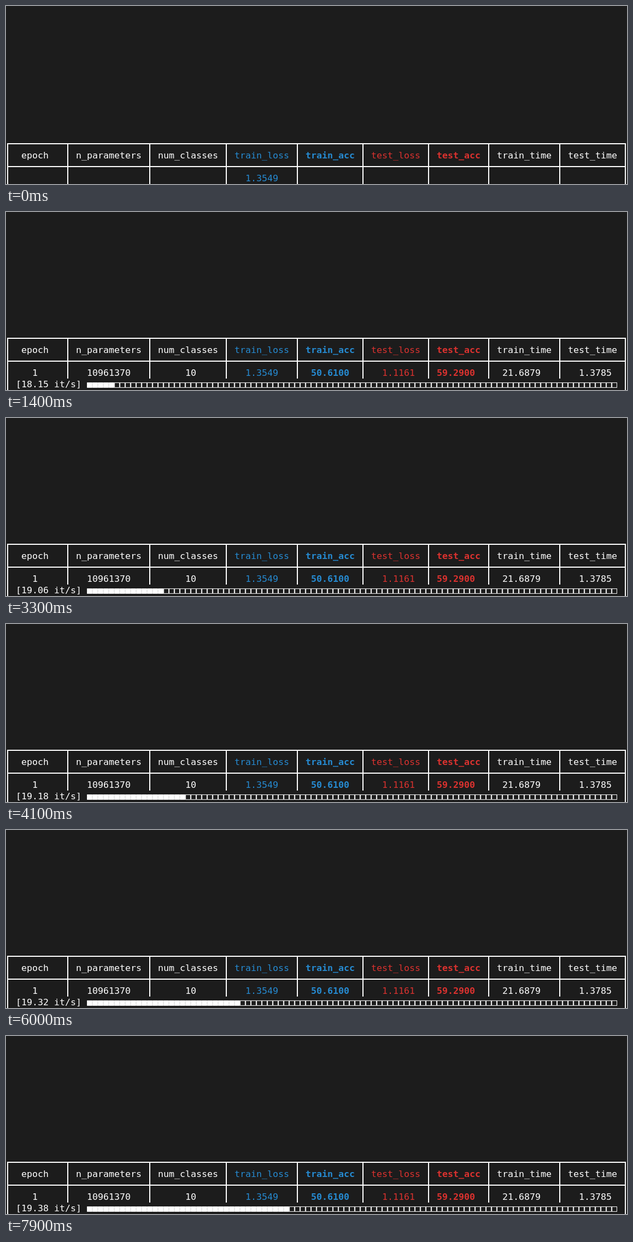
Animation of 1136x327 px, one loop 8 s. Source, as an HTML page with a canvas:

```html
<!DOCTYPE html>
<html lang="en">
<head>
<meta charset="utf-8">
<title>Training table</title>
<style>
html, body { margin: 0; width: 100%; height: 100%; overflow: hidden; background: #1c1c1c; }
canvas { display: block; }
</style>
</head>
<body>
<canvas id="stage" width="1136" height="327"></canvas>
<script>
const ctx = document.getElementById('stage').getContext('2d');
const LOOP = 8000, ROW = 21, CELLS = 97;
const WHITE = '#ffffff', BLUE = '#268bd2', RED = '#dc322f';

// left border, title, title x, value, value x, colour, bold
const columns = [
  [3, 'epoch', 28, '1', 48, WHITE],
  [113, 'n_parameters', 128, '10961370', 148, WHITE],
  [263, 'num_classes', 278, '10', 328, WHITE],
  [403, 'train_loss', 418, '1.3549', 438, BLUE],
  [533, 'train_acc', 548, '50.6100', 558, BLUE, true],
  [653, 'test_loss', 668, '1.1161', 688, RED],
  [773, 'test_acc', 788, '59.2900', 788, RED, true],
  [883, 'train_time', 898, '21.6879', 908, WHITE],
  [1013, 'test_time', 1028, '1.3785', 1048, WHITE]
];
const RIGHT = 1133;

// The rate climbs hyperbolically towards its limit.
const LIMIT = 19.58;
const rates = [[300, 5], [600, 13.86], [2200, 18.76], [3300, 19.06],
  [5000, 19.26], [6000, 19.32], [7900, 19.38]];

// Refreshes that are skipped
const skipped = [2500, 5100, 5700, 5900, 6100, 6300, 6800, 7000, 7200, 7500, 7600];

function rateAt(t) {
  const i = Math.max(1, rates.findIndex(([time]) => time >= t));
  const [t0, r0] = rates[i - 1], [t1, r1] = rates[i];
  const a = 1 / (LIMIT - r0), b = 1 / (LIMIT - r1);
  return LIMIT - 1 / (a + (b - a) * (t - t0) / (t1 - t0));
}

function text(str, x, rowTop, color = WHITE, bold = false) {
  ctx.font = `${bold ? 'bold ' : ''}16.6px "DejaVu Sans Mono", monospace`;
  ctx.fillStyle = color;
  ctx.fillText(str, x, rowTop + 16);
}

function hLine(y) {
  ctx.fillStyle = WHITE;
  ctx.fillRect(2, y, RIGHT - 1, 2);
}

function vLine(x, top, bottom) {
  ctx.fillStyle = WHITE;
  ctx.fillRect(x - 1, top, 2, bottom - top);
}

function drawTable(top, innerEnd, complete) {
  hLine(top);
  hLine(top + 2 * ROW);
  const titleTop = top - 9 + ROW;
  for (const [left, title, titleX, value, valueX, color, bold] of columns) {
    vLine(left, top, left === 3 ? 327 : innerEnd);
    text(title, titleX, titleTop, color, bold);
    if (complete || title === 'train_loss') text(value, valueX, titleTop + 2 * ROW, color, bold);
  }
  vLine(RIGHT, top, 327);
}

function drawProgress(tick) {
  text(`[${rateAt(tick).toFixed(2)} it/s]`, 18, 306);
  const done = Math.max(0, Math.floor((tick - 400) / 200));
  ctx.fillStyle = ctx.strokeStyle = WHITE;
  ctx.lineWidth = 1;
  for (let i = 0; i < CELLS; i++) {
    const x = 148 + 10 * i;
    if (i < done) ctx.fillRect(x + 0.1, 313.1, 9.8, 9.8);
    else ctx.strokeRect(x + 0.6, 313.6, 8.8, 8.8);
  }
}

function draw(t) {
  let tick = Math.floor(t / 100) * 100;
  while (skipped.includes(tick)) tick -= 100;
  ctx.fillStyle = '#1c1c1c';
  ctx.fillRect(0, 0, 1136, 327);
  if (tick < 300) {
    drawTable(252, 327, false);
  } else {
    drawTable(231, 306, true);
    drawProgress(tick);
  }
}

const start = performance.now();
function frame() {
  draw((performance.now() - start) % LOOP);
  requestAnimationFrame(frame);
}
frame();
</script>
</body>
</html>
```
